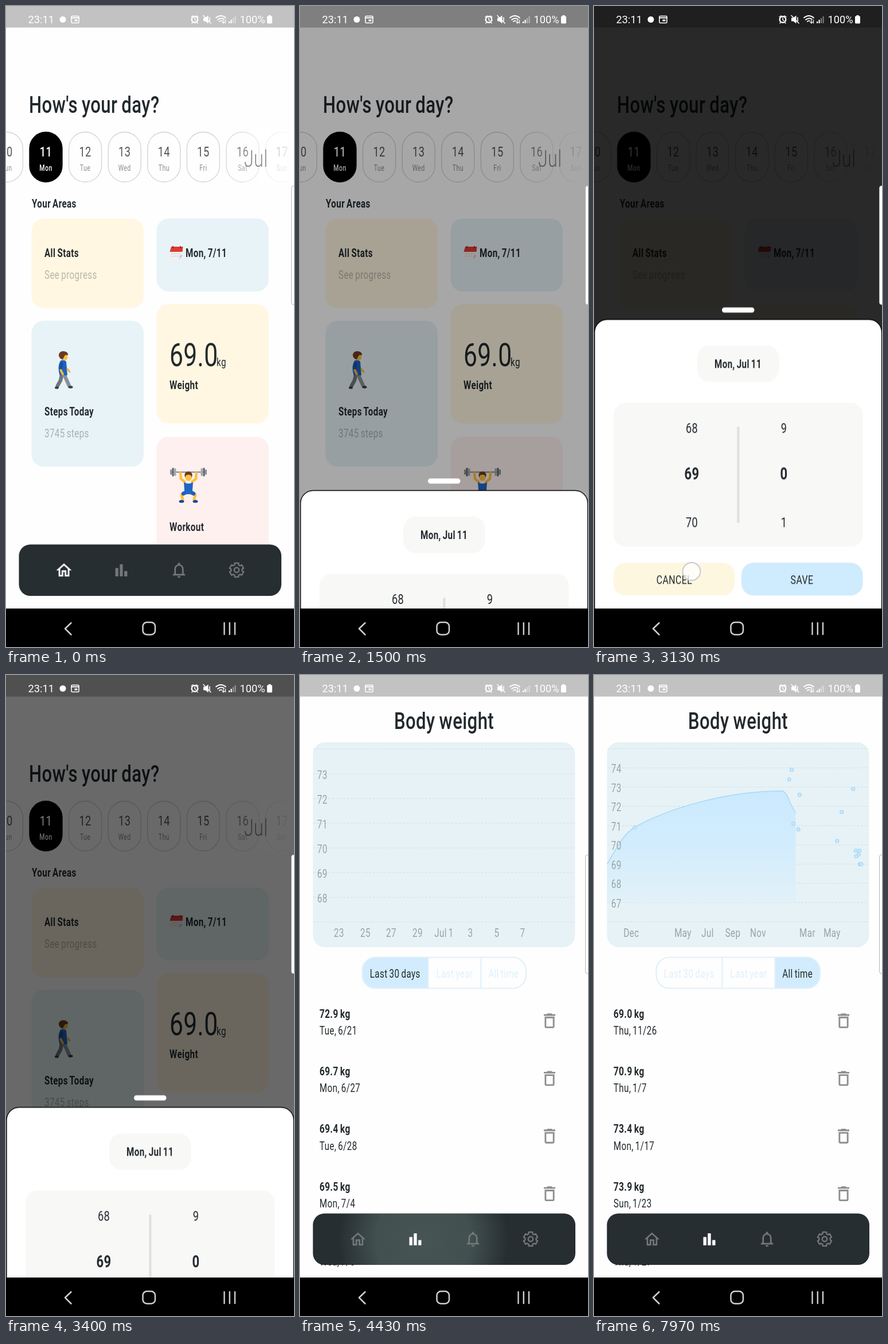
An HTML page that plays this animation: 502 by 1116 pixels, repeating every 8000 ms.

```html
<!DOCTYPE html>
<html lang="en">
<head>
<meta charset="utf-8">
<title>Day tracker</title>
<style>
  html, body { margin: 0; width: 100%; height: 100%; overflow: hidden; background: #fff; }
  svg { display: block; width: 100vw; height: 100vh; }
  text { font-family: Roboto, "Open Sans", sans-serif; letter-spacing: .5px; word-spacing: -1.5px; white-space: pre; }
  .status text { letter-spacing: 0; }
</style>
</head>
<body>
<script>
const LOOP = 8000, INK = '#22292d', BLUE = '#a3d8fa';
const T = { toStats: 4230, toYear: 5780, toAll: 7250 };
const rules = [];

// ---- motion helpers (times in ms) ----
function anim(sel, prop, stops, ease = 'linear') {
  const name = 'k' + rules.length;
  const body = stops.map(([ms, v]) => `${ms / LOOP * 100}%{${prop}:${v}}`).join('');
  rules.push(`@keyframes ${name}{${body}}${sel}{animation:${name} ${LOOP}ms ${ease} infinite}`);
}
function show(sel, from, to) {
  const stops = from ? [[0, 0], [from, 1]] : [[0, 1]];
  if (to < LOOP) stops.push([to, 0]);
  stops.push([LOOP, to < LOOP ? 0 : 1]);
  anim(sel, 'opacity', stops, 'step-end');
}
function slide(sel, stops) {
  anim(sel, 'transform', stops.map(([ms, y]) => [ms, `translateY(${y}px)`]));
}

// ---- drawing helpers ----
const rect = (x, y, x2, y2, r, fill, more = '') =>
  `<rect x="${x}" y="${y}" width="${x2 - x}" height="${y2 - y}" rx="${r}" fill="${fill}" ${more}/>`;
const circle = (x, y, r, fill, more = '') => `<circle cx="${x}" cy="${y}" r="${r}" fill="${fill}" ${more}/>`;
const oval = (x, y, rx, ry, fill) => `<ellipse cx="${x}" cy="${y}" rx="${rx}" ry="${ry}" fill="${fill}"/>`;
const fillPath = (d, fill, more = '') => `<path d="${d}" fill="${fill}" ${more}/>`;
const stroke = (d, color, w, more = '') =>
  `<path d="${d}" fill="none" stroke="${color}" stroke-width="${w}" stroke-linecap="round" stroke-linejoin="round" ${more}/>`;
// one condensed face for all app text
const label = (x, y, s, size = 20, weight = 400, fill = INK, anchor = 'start') =>
  `<text transform="translate(${x} ${y}) scale(.76 1)" font-size="${size}" font-weight="${weight}" fill="${fill}" text-anchor="${anchor}">${s}</text>`;
const mid = (x, y, s, size, weight, fill) => label(x, y, s, size, weight, fill, 'middle');
const glyph = (d, x, y, k, fill) =>
  `<path fill-rule="evenodd" transform="translate(${x} ${y}) scale(${k}) translate(-12 -12)" d="${d}" fill="${fill}"/>`;
const group = (cls, body, more = '') => `<g class="${cls}" ${more}>${body}</g>`;

const HOUSE = 'M12 5.7l5 4.5V18h-2v-6H9v6H7v-7.8zM12 3L2 12h3v8h6v-6h2v6h6v-8h3z';
const BARS = 'M4 9h4v11H4zm12 4h4v7h-4zm-6-9h4v16h-4z';
const BELL = 'M12 22c1.1 0 2-.9 2-2h-4c0 1.1.9 2 2 2zm6-6v-5c0-3.1-1.6-5.6-4.5-6.3V4c0-.8-.7-1.5-1.5-1.5s-1.5.7-1.5 1.5v.7C7.6 5.4 6 7.9 6 11v5l-2 2v1h16v-1zm-2 1H8v-6c0-2.5 1.5-4.5 4-4.5s4 2 4 4.5z';
const BIN = 'M6 19c0 1.1.9 2 2 2h8c1.1 0 2-.9 2-2V7H6zM8 9h8v10H8zm7.5-5l-1-1h-5l-1 1H5v2h14V4z';

// ---- home page ----
function dayPills() {
  return ['Sun', 'Mon', 'Tue', 'Wed', 'Thu', 'Fri', 'Sat', 'Sun'].map((day, i) => {
    const x = 69.5 + (i - 1) * 68.6, on = i === 1;
    return rect(x - 28.5, 219.5, x + 28.5, 306.5, 28.5, on ? '#000' : 'none', `stroke="${on ? '#000' : '#d2d2d2'}" stroke-width="1.3"`)
      + mid(x, 262, 10 + i, 24, on ? 500 : 400, on ? '#fff' : '#555')
      + mid(x, 287, day, 14, on ? 500 : 400, on ? '#fff' : '#8d8d8d');
  }).join('') + rect(370, 215, 502, 310, 0, 'url(#fade)') + label(415, 280, 'Jul', 40, 300, '#8a8a8a');
}

function calendar() {
  return fillPath('M285.5 427H308V434L302 441H285.5Z', '#f1efee') + fillPath('M302 441L303 434H308Z', '#c4c4c6')
    + fillPath('M288 419H308.5L307.5 428H285.5Z', '#dc3a32')
    + stroke('M291 418.5V421M304 418.5V421', '#7a2a26', 1.6)
    + stroke('M289 431.5H304M288.5 435.5H301', '#c9c7c7', 1.2, 'stroke-dasharray="2 2.6"');
}

function walker() {
  return stroke('M97 643L95 652L90 661', '#70767c', 6.5) + stroke('M102 643L106 652L110 661', '#8a9096', 6.5)
    + oval(88.5, 664.5, 3.5, 2.2, '#3d3d40') + oval(112.5, 663.5, 4, 2.2, '#3d3d40')
    + circle(99.5, 608.5, 7, '#6b3b20') + oval(103, 611, 4.5, 5.5, '#fbc23e')
    + fillPath('M92 609Q92 601 100 601Q109 602 108 608Q102 606 101 612Q96 617 92 609Z', '#6b3b20')
    + fillPath('M95 617.5Q101 615 105 619L107 643H93.5Q89 627 95 617.5Z', '#2062bd')
    + stroke('M97 623L95.5 631', '#184f9c', 5) + stroke('M95.5 634L99 641', '#f5b735', 4)
    + stroke('M107 632L111 637', '#f5b735', 3);
}

function lifter() {
  const half = stroke('M304 813L305 823L312 829', '#fbc23e', 4.5)
    + stroke('M314 848L306 851L308 859', '#fbc23e', 5) + stroke('M315 846L309 849', '#1f5fc0', 6.5)
    + oval(306, 862.5, 4.5, 2.5, '#164a93')
    + rect(286, 807, 289.5, 816, 1, '#8d9499') + rect(289.5, 804, 292.5, 819, 1, '#5e666c') + rect(293, 805, 296.5, 818, 1, '#a3a9ad');
  return stroke('M288 811.5H348', '#7d858a', 2.2) + half + `<g transform="translate(636 0) scale(-1 1)">${half}</g>`
    + circle(318, 817.5, 6.5, '#6b3b20') + oval(318, 821, 5.5, 6, '#fbc23e')
    + fillPath('M311.5 818Q311 810.5 318 810.5Q325 810.5 324.5 818Q318 814 311.5 818Z', '#6b3b20')
    + fillPath('M310 829Q318 834 326 829L324.5 850H311.5Z', '#1f66c4');
}

function home() {
  const yellow = '#fff7e1', blue = '#e7f3f7';
  return label(40, 186, "How's your day?", 41, 500) + dayPills() + label(45, 351, 'Your Areas', 20, 600)
    + rect(44.5, 370, 240, 526, 21, yellow) + rect(262.5, 370, 458, 497, 21, blue)
    + rect(44.5, 548, 240, 802, 21, blue) + rect(262.5, 519, 458, 727, 21, yellow) + rect(262.5, 750, 458, 1004, 21, '#fff0f0')
    + label(67, 437, 'All Stats', 20, 600) + label(67, 475, 'See progress', 20, 400, '#b9b5a8')
    + calendar() + label(313, 437, 'Mon, 7/11', 20, 600)
    + walker() + label(67, 713, 'Steps Today', 20, 600) + label(67, 751, '3745 steps', 20, 400, '#a7b0b5')
    + label(285, 627, '69.0', 56, 400) + label(367, 627, 'kg') + label(285, 667, 'Weight', 20, 600)
    + lifter() + label(285, 914, 'Workout', 20, 600);
}

// ---- statistics page ----
// [day counted from January 17, weight in kg]
const log = [[-374, 70.9], [0, 73.4], [6, 73.9], [10, 71.1], [22, 70.8], [25, 72.6], [116, 70.2], [127, 71.7],
  [155, 72.9], [161, 69.7], [162, 69.4], [168, 69.5], [170, 69.7], [171, 69], [172, 69], [174.5, 69]];

const views = [
  { id: 'month', first: 155, x0: 26.5, perDay: 22.85, top: 73, step: 43, base: 172,
    ticks: [[68, 23], [114, 25], [159, 27], [205, 29], [251, 'Jul 1'], [297, 3], [343, 5], [388, 7]],
    rows: ['72.9|Tue, 6/21', '69.7|Mon, 6/27', '69.4|Tue, 6/28', '69.5|Mon, 7/4', '69.7|Wed, 7/6'] },
  { id: 'year', first: 0, x0: 59, perDay: 2.163, top: 74, step: 33.5, base: 161.7,
    ticks: [[156, '2022 Mar'], [287, 'May']],
    line: 'M23 201C45 214 65 231 84 236C130 250 220 255 282 263.5C340 271 385 282 405 305S430 326 436 329',
    rows: ['73.4|Mon, 1/17', '73.9|Sun, 1/23', '71.1|Thu, 1/27', '70.8|Tue, 2/8', '72.6|Fri, 2/11'] },
  { id: 'all', first: -374, x0: 71, perDay: .72, top: 74, step: 33.5, base: 161.7,
    ticks: [[65, 'Dec'], [155, 'May'], [198, 'Jul'], [242, 'Sep'], [286, 'Nov'], [372, 'Mar'], [415, 'May']],
    line: 'M23 329C38 304 50 278 71 265C130 232 230 202 327 202C338 202 341 228 352 240C366 246 398 252 414 265C440 280 452 300 465 329',
    rows: ['69.0|Thu, 11/26', '70.9|Thu, 1/7', '73.4|Mon, 1/17', '73.9|Sun, 1/23', '71.1|Thu, 1/27'] },
];

function chart(v) {
  const y = kg => v.base + (v.top - kg) * v.step;
  const grey = '#98a3a6';
  let out = rect(22.5, 117, 479.5, 474, 21, '#e6f2f5');
  for (let kg = v.top + 1; y(kg) < 432; kg--) {
    out += `<path d="M23 ${y(kg)}H479" stroke="#d2dfe2" stroke-dasharray="4 2.5"/>`;
  }
  if (v.line) {
    out += `<clipPath id="clip-${v.id}"><rect class="wipe-${v.id}" x="23" y="117" width="0" height="357"/></clipPath>`
      + `<g clip-path="url(#clip-${v.id})">${fillPath(v.line + 'V396H23Z', 'url(#area)')}${stroke(v.line, BLUE, 1.5)}</g>`;
  }
  for (let kg = v.top; y(kg) < 410; kg--) out += label(30, y(kg) + 8.7, kg, 20, 400, grey);
  out += v.ticks.map(([x, s]) => mid(x, 456, s, 20, 400, grey)).join('');
  const dots = log.filter(p => p[0] >= v.first)
    .map(([d, kg]) => circle(v.x0 + (d - v.first) * v.perDay, y(kg), 2.9, '#cdeafc', `stroke="${BLUE}" stroke-width="1.3"`));
  return out + group('dots-' + v.id, dots.join(''));
}

function tabs(active) {
  const edges = [108, 223.5, 315.5, 394], names = ['Last 30 days', 'Last year', 'All time'];
  const pale = '#dff0fc';
  return `<g clip-path="url(#pill)">${rect(edges[active], 491, edges[active + 1], 546, 0, '#d2ecfe')}</g>`
    + rect(108.5, 491.5, 394, 545.5, 23, 'none', `stroke="${pale}" stroke-width="2.2"`)
    + stroke('M223.5 492V545M315.5 492V545', pale, 2)
    + names.map((s, i) => mid((edges[i] + edges[i + 1]) / 2, 526.5, s, 20, 400, i === active ? INK : pale)).join('');
}

const list = rows => rows.map((row, i) => {
  const [kg, day] = row.split('|'), y = 596.5 + i * 100.4;
  return label(34, y, kg + ' kg', 20.5, 700) + label(34, y + 29.5, day)
    + (i < 4 ? glyph(BIN, 435, y + 5.5, 1.43, '#8e8e8e') : '');
}).join('');

const stats = () => mid(251, 94, 'Body weight', 41, 500)
  + views.map((v, i) => group(v.id, chart(v) + tabs(i) + list(v.rows))).join('');

// ---- fixed chrome ----
function gear(x, y, color) {
  const pts = [];
  for (let i = 0; i < 6; i++) {
    for (const [da, r] of [[-.27, 12.6], [.27, 12.6], [.36, 9.7], [.687, 9.7]]) {
      const a = (i + .5) * Math.PI / 3 + da;
      pts.push(`${(x + r * Math.cos(a)).toFixed(1)} ${(y + r * Math.sin(a)).toFixed(1)}`);
    }
  }
  return stroke(`M${pts.join('L')}Z`, color, 2.3) + circle(x, y, 4.2, 'none', `stroke="${color}" stroke-width="2.4"`);
}

function tabBar() {
  const dim = '#72777a', house = c => glyph(HOUSE, 101, 982.5, 1.33, c), bars = c => glyph(BARS, 201, 982.5, 1.3, c);
  return rect(22.5, 937.5, 480, 1027, 20, '#272e32')
    + `<g clip-path="url(#bar)">${group('ripple', rect(23, 938, 479, 1027, 0, 'url(#glow)'))}</g>`
    + house(dim) + bars(dim) + glyph(BELL, 301.5, 982, 1.35, dim) + gear(402, 982, dim)
    + group('at-home', house('#fff')) + group('at-stats', bars('#fff'));
}

function statusBar() {
  const w = '#fff';
  const text = (x, s) => `<text x="${x}" y="30" font-size="18.3" fill="#fff">${s}</text>`;
  return text(38.5, '23:11') + circle(99, 23.5, 5.5, w)
    + rect(114, 17.5, 127, 29.5, 1.5, 'none', 'stroke="#fff" stroke-width="1.6"') + stroke('M114 20.5H127', w, 2) + rect(119.5, 23.5, 124.5, 26.5, 0, w)
    + circle(329, 23.5, 5.3, 'none', 'stroke="#fff" stroke-width="2.4"') + stroke('M329 21V24L331 25.5M323 19L326 17M335 19L332 17M325 29L324 30M333 29L334 30', w, 1.5)
    + fillPath('M344 20.5h3.5l5-4v14l-5-4H344z', w) + stroke('M344 16.5L357 30M355 20V26', w, 1.6)
    + stroke('M366 20.5Q374.5 13.5 383 20.5M369 24Q374.5 19.5 380 23M372 27Q374 25 376 26', w, 1.8) + stroke('M379 24V30M377 28L379 30L381 28M382.5 30V24', w, 1.2)
    + [0, 1, 2, 3].map(i => rect(388 + i * 3.5, 27 - i * 3, 390.2 + i * 3.5, 30, 0, w, i > 1 ? 'opacity=".4"' : '')).join('')
    + text(407.5, '100%') + rect(455, 17.5, 464, 30.5, 1.5, w) + rect(457.5, 16, 461.5, 18, 0, w);
}

const systemBar = () => rect(0, 1049, 502, 1116, 0, '#000')
  + stroke('M113.5 1074L103 1084L113.5 1094.5', '#cfcfcf', 2.5)
  + rect(238.5, 1073, 260, 1094.5, 7, 'none', 'stroke="#cfcfcf" stroke-width="2.5"')
  + stroke('M380.5 1074V1094M389.8 1074V1094M399 1074V1094', '#cfcfcf', 2.4);

// weight picker, drawn with its top edge at y = 0
function sheet() {
  const wheel = (x, a, b, c) => mid(x, 198.5, a, 24) + mid(x, 279, b, 29, 700) + mid(x, 362.5, c, 24);
  return rect(223, -20.5, 279.5, -11.5, 4.5, '#fff')
    + rect(1, .5, 501.5, 620, 22, '#fff', 'stroke="#000" stroke-width="1.3"')
    + rect(180, 46, 322.5, 109, 21, '#f8f8f7') + mid(251, 85.5, 'Mon, Jul 11', 20, 600)
    + rect(34, 145.5, 468.5, 396, 21, '#f8f8f7') + rect(249.3, 187, 253.5, 355, 2, '#e0e0e0')
    + wheel(170.5, 68, 69, 70) + wheel(331, 9, 0, 1)
    + rect(34, 424, 245.5, 481, 21, '#fef7e0') + rect(257, 424, 468.5, 481, 21, '#cfebfe')
    + mid(140, 461, 'CANCEL', 21) + mid(362.5, 461, 'SAVE', 21);
}

// [x, y, shown from, to]
const taps = [[371.5, 657, 1330, 1470], [170, 984.5, 2270, 3230], [201, 983, 4030, 4260],
  [268, 518, 5600, 5820], [353, 515, 7130, 7320]];
const touches = () => taps.map(([x, y], i) => group('tap' + i,
  circle(x, y, 15.5, '#fff', 'fill-opacity=".72" stroke="#c9c9d2" stroke-width="2"'))).join('');

// ---- timeline ----
show('.home, .at-home', 0, T.toStats);
show('.stats, .at-stats', T.toStats, LOOP);
show('.month', T.toStats, T.toYear);
show('.year', T.toYear, T.toAll);
show('.all', T.toAll, LOOP);
taps.forEach(([, , from, to], i) => show('.tap' + i, from, to));

anim('.scrim', 'opacity', [[0, 0], [1340, 0], [1400, .05], [1500, .34], [1600, .66], [1670, .8], [1800, .84],
  [3130, .84], [3270, .76], [3400, .585], [3500, .42], [3600, .26], [3750, .1], [3930, 0], [LOOP, 0]]);
slide('.sheet', [[0, 1090], [1400, 1080], [1450, 965], [1500, 845], [1550, 745], [1600, 662], [1670, 582], [1730, 554], [1800, 545],
  [3130, 545], [3230, 575], [3320, 655], [3400, 751], [3500, 875], [3600, 972], [3700, 1037], [3800, 1080], [LOOP, 1090]]);
anim('.ripple', 'opacity', [[0, 0], [4130, 0], [4300, 1], [4430, .95], [4800, 0], [LOOP, 0]]);

const fadeIn = (id, from, to) => anim('.dots-' + id, 'opacity', [[0, 0], [from, 0], [to, 1], [LOOP, 1]]);
fadeIn('month', 4870, 5300);
fadeIn('year', 5820, 6220);
fadeIn('all', 7280, 7680);
anim('.wipe-year', 'width', [[0, '0px'], [5817, '0px'], [6700, '414px'], [LOOP, '414px']]);
anim('.wipe-all', 'width', [[0, '0px'], [7270, '0px'], [7970, '328px'], [LOOP, '342px']]);

// ---- assemble ----
const defs = `<defs>
  <linearGradient id="fade"><stop offset="0" stop-color="#fff" stop-opacity="0"/><stop offset=".9" stop-color="#fff" stop-opacity=".85"/><stop offset="1" stop-color="#fff"/></linearGradient>
  <linearGradient id="area" gradientUnits="userSpaceOnUse" x1="0" y1="200" x2="0" y2="400"><stop offset="0" stop-color="#cbe9fe"/><stop offset=".45" stop-color="#d1ecfd"/><stop offset="1" stop-color="#e2f1f7"/></linearGradient>
  <radialGradient id="glow" gradientUnits="userSpaceOnUse" cx="215" cy="983" r="150"><stop offset="0" stop-color="#485856"/><stop offset=".55" stop-color="#445352"/><stop offset="1" stop-color="#445352" stop-opacity="0"/></radialGradient>
  <clipPath id="pill">${rect(108, 491, 394, 546, 23, '#000')}</clipPath>
  <clipPath id="bar">${rect(22.5, 937.5, 480, 1027, 20, '#000')}</clipPath>
</defs>`;

const scene = defs + rect(0, 0, 502, 1116, 0, '#fefefe')
  + group('home', home()) + group('stats', stats()) + tabBar()
  + rect(0, 0, 502, 37.5, 0, '#c2c2c2')
  + group('scrim', rect(0, 0, 502, 1050, 0, '#000'))
  + group('status', statusBar())
  + rect(497.5, 313, 512, 520, 4, '#fff', 'stroke="#b5b5b5"')
  + group('sheet', sheet()) + touches() + systemBar();

document.head.insertAdjacentHTML('beforeend', `<style>${rules.join('\n')}</style>`);
document.body.innerHTML = `<svg viewBox="0 0 502 1116" preserveAspectRatio="none">${scene}</svg>`;
</script>
</body>
</html>
```
